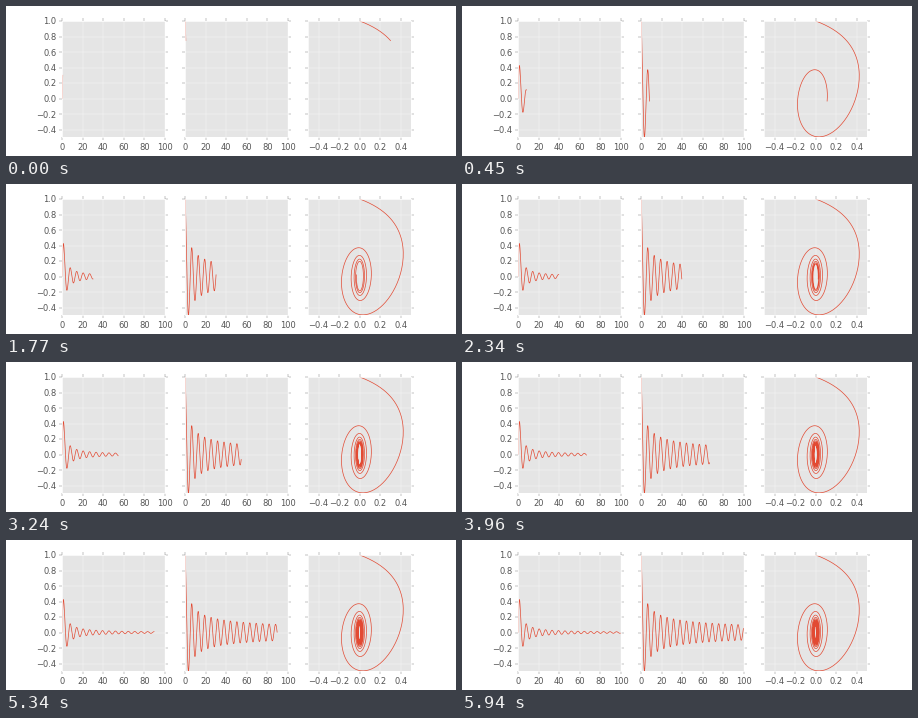
These frames come from a looping animation (450 px wide and 150 px high, 5970 ms). A matplotlib script:

```python
import numpy as np
import matplotlib.pyplot as plt
from matplotlib.animation import FuncAnimation
from matplotlib.ticker import MultipleLocator

plt.rcParams.update({
    "font.family": "DejaVu Sans",
    "font.size": 12,
    "axes.facecolor": "#E5E5E5",
    "axes.edgecolor": "white",
    "axes.linewidth": 1,
    "axes.grid": True,
    "axes.axisbelow": True,
    "grid.color": "white",
    "grid.linewidth": 0.5,
    "lines.linewidth": 1,
})
for axis, far_side in (("xtick", "top"), ("ytick", "right")):
    plt.rcParams.update({
        f"{axis}.{far_side}": True,
        f"{axis}.color": "#555555",
        f"{axis}.direction": "out",
        f"{axis}.labelsize": 12,
        f"{axis}.major.size": 4,
        f"{axis}.major.width": 0.5,
        f"{axis}.major.pad": 4,
    })

SAMPLES, STEP = 2000, 10
FRAMES = SAMPLES // STEP - 1

t = np.linspace(0, 100, SAMPLES)
x = np.sin(t) / (1 + t)
y = np.cos(t) / np.sqrt(1 + t)
curves = [(t, x), (t, y), (x, y)]

fig, axes = plt.subplots(1, 3, sharey=True, figsize=(9, 3), dpi=50,
                         facecolor="white")
fig.subplots_adjust(left=0.125, right=0.9, bottom=0.125, top=0.9, wspace=0.2)

limits = [(0, 100, 20), (0, 100, 20), (-0.5, 0.5, 0.2)]
for ax, (lo, hi, tick) in zip(axes, limits):
    ax.set_xlim(lo, hi)
    ax.xaxis.set_major_locator(MultipleLocator(tick))
axes[0].set_ylim(-0.5, 1)
axes[0].yaxis.set_major_locator(MultipleLocator(0.2))

lines = [ax.plot([], [], color="#E24A33")[0] for ax in axes]


def update(frame):
    end = (frame + 1) * STEP
    for line, (u, v) in zip(lines, curves):
        line.set_data(u[:end], v[:end])
    return lines


anim = FuncAnimation(fig, update, frames=FRAMES, interval=30,
                     repeat=True, repeat_delay=0)
plt.show()
```
